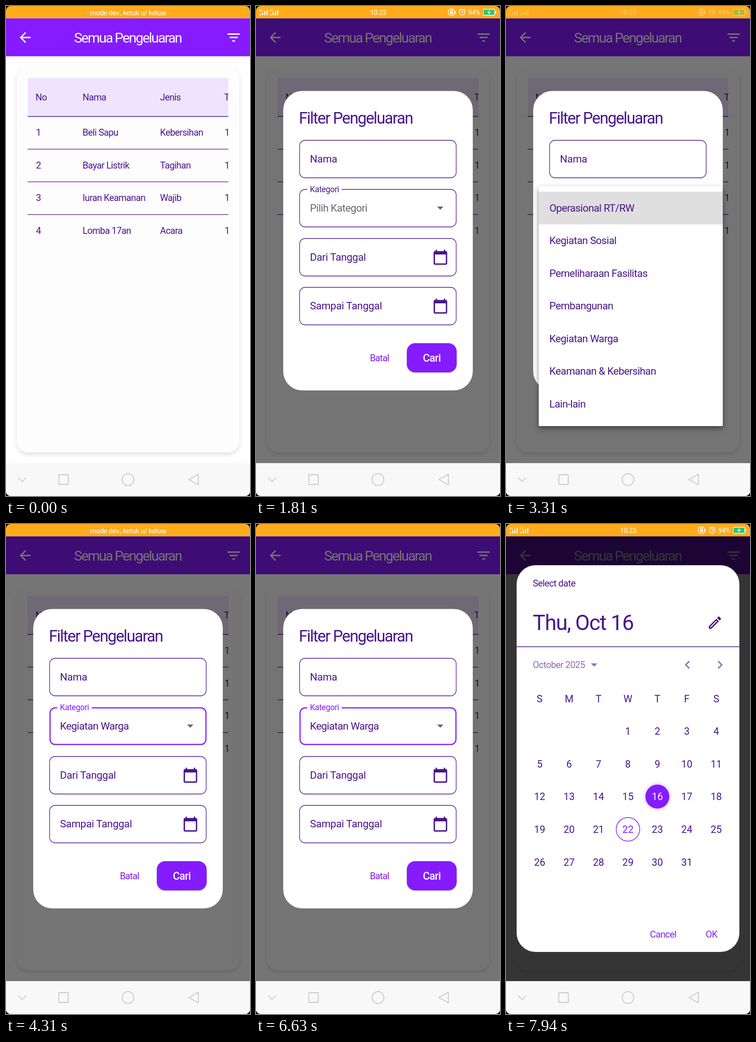
An HTML page that plays this animation: 529 px wide and 1058 px high, repeating every 8000 ms.

```html
<!DOCTYPE html>
<html lang="id">
<head>
<meta charset="utf-8">
<title>Semua Pengeluaran</title>
<style>
html, body { margin: 0; width: 100%; height: 100%; overflow: hidden; background: #000; }
svg { display: block; width: 100%; height: 100%; }
text { font-family: Roboto, "Noto Sans", sans-serif; fill: var(--ink); white-space: pre; }
:root { --ink: #4a148c; --main: #861bff; }

.cell { font-size: 20px; letter-spacing: -.62px; }
.bar { font-size: 30px; letter-spacing: -2px; fill: #fff; }
.head { font-size: 34.5px; letter-spacing: -1.7px; }
.field { font-size: 22.5px; letter-spacing: -.32px; }
.item { font-size: 22.5px; letter-spacing: -.62px; }
.label { font-size: 17.6px; letter-spacing: -.35px; }
.btn { font-size: 20px; letter-spacing: -.9px; fill: #7a1be6; }
.cari { font-size: 23px; letter-spacing: -.7px; font-weight: 500; fill: #fff; }
.date { font-size: 46px; letter-spacing: -1.3px; }
.day { font-size: 21.5px; text-anchor: middle; }
.tiny { font-size: 14.5px; letter-spacing: -.4px; fill: #fff; }
.mode { font-size: 15.5px; letter-spacing: -.5px; fill: #fff; }
.net { font-size: 7px; fill: #fff; }
.mid { text-anchor: middle; }
.white { fill: #fff; }
.main { fill: var(--main); }
.grey { fill: #686868; }
.soft { fill: #8e6cb8; }
.line { fill: none; stroke: var(--ink); stroke-width: 1.3; }
.focus { fill: none; stroke: var(--main); stroke-width: 2.5; }
.nav { fill: none; stroke: #c6c6c6; stroke-width: 1.8; }

/* one loop is 8 s, so 1% is 80 ms */
.dev, .clock, .tap, .dialog, .menu, .panel, .item-in, .press, .picker, .splash {
  animation: 8s linear infinite both;
}
.dev { animation-name: dev; }
.clock { animation-name: clock; }
.tap { animation-name: tap; }
.dialog { animation-name: dialog; }
.menu { animation-name: menu; }
.panel { animation-name: panel; filter: drop-shadow(0 5px 6px rgba(0,0,0,.45)); }
.item-in { animation-name: items; }
.press { animation-name: press; }
.picker { animation-name: picker; }
.splash { animation-name: splash; }
.focus-on { animation: focus-on 8s step-end infinite; }
.focus-off { animation: focus-off 8s step-end infinite; }
.chosen { animation: chosen 8s step-end infinite; }
.hint { animation: hint 8s step-end infinite; }
.after { animation: after 8s step-end infinite; }
.before { animation: before 8s step-end infinite; }

@keyframes dev { 0%, 1.25% { opacity: 1 } 5.6%, 43.1% { opacity: 0 } 48.1%, 77.5% { opacity: 1 } 82.2%, 100% { opacity: 0 } }
@keyframes clock { 0%, 6.2% { opacity: 0 } 11%, 39% { opacity: 1 } 42.8%, 83.1% { opacity: 0 } 87.5%, 100% { opacity: 1 } }
@keyframes tap { 0%, 15.6% { opacity: 0; r: 8px } 16.6% { opacity: .04 } 17.3% { opacity: .035; r: 26px } 19.6%, 100% { opacity: 0; r: 26px } }
@keyframes dialog { 0%, 18.5% { opacity: 0; animation-timing-function: ease-out } 20.4%, 100% { opacity: 1 } }
@keyframes menu { 0%, 27% { opacity: 0 } 28%, 51.9% { opacity: 1 } 53%, 100% { opacity: 0 } }
@keyframes panel { 0%, 28% { y: 400px; height: 71px; animation-timing-function: ease } 29%, 100% { y: 389px; height: 518px } }
@keyframes items { 0%, 29% { opacity: 0 } 29.4%, 60% { opacity: 1 } 61%, 100% { opacity: 0 } }
@keyframes press { 0%, 49.3% { opacity: 0; r: 20px } 49.8% { opacity: .12 } 51.9% { opacity: .12; r: 260px } 53%, 100% { opacity: 0; r: 260px } }
@keyframes picker { 0%, 86.2% { opacity: 0; animation-timing-function: ease-out } 88.1%, 100% { opacity: 1 } }
@keyframes splash { 0%, 96.2% { opacity: 0; r: 8px } 97% { opacity: .12 } 98.3% { opacity: .12; r: 31px } 100% { opacity: .08; r: 31px } }
@keyframes focus-on { 0% { opacity: 0 } 27%, 100% { opacity: 1 } }
@keyframes focus-off { 0% { opacity: 1 } 27%, 100% { opacity: 0 } }
@keyframes chosen { 0% { opacity: 0 } 52%, 100% { opacity: 1 } }
@keyframes hint { 0% { opacity: 1 } 52%, 100% { opacity: 0 } }
@keyframes after { 0% { opacity: 0 } 97%, 100% { opacity: 1 } }
@keyframes before { 0% { opacity: 1 } 97%, 100% { opacity: 0 } }
</style>
</head>
<body>
<svg id="stage" viewBox="0 0 529 1058" xmlns="http://www.w3.org/2000/svg"></svg>
<script>
const icons = {
  back: 'M20 11H7.83l5.59-5.59L12 4l-8 8 8 8 1.41-1.41L7.83 13H20v-2z',
  filter: 'M10 18h4v-2h-4v2zM3 6v2h18V6H3zm3 7h12v-2H6v2z',
  calendar: 'M20 3h-1V1h-2v2H7V1H5v2H4c-1.1 0-2 .9-2 2v16c0 1.1.9 2 2 2h16c1.1 0 2-.9 2-2V5c0-1.1-.9-2-2-2zm0 18H4V8h16v13z',
  pencil: 'M14.06 9.02l.92.92L5.92 19H5v-.92l9.06-9.06M17.66 3c-.25 0-.51.1-.7.29l-1.83 1.83 3.75 3.75 1.83-1.83c.39-.39.39-1.02 0-1.41l-2.34-2.34c-.2-.2-.45-.29-.71-.29zm-3.6 3.19L3 17.25V21h3.75L17.81 9.94l-3.75-3.75z',
  prev: 'M15.41 7.41 14 6l-6 6 6 6 1.41-1.41L10.83 12z',
  next: 'M10 6 8.59 7.41 13.17 12l-4.58 4.59L10 18l6-6z',
  drop: 'M7.4 10h9.2L12 14.8z'
};

const text = (x, y, str, cls) => `<text x="${x}" y="${y}" class="${cls}">${str.replace('&', '&amp;')}</text>`;
const rect = (x, y, w, h, rx, attrs) => `<rect x="${x}" y="${y}" width="${w}" height="${h}" rx="${rx}" ${attrs}/>`;
const disc = (x, y, r, attrs) => `<circle cx="${x}" cy="${y}" r="${r}" ${attrs}/>`;
const group = (cls, ...parts) => `<g class="${cls}">${parts.join('')}</g>`;
const path = (d, attrs) => `<path d="${d}" ${attrs}/>`;
const icon = (name, x, y, fill) =>
  path(icons[name], `fill="${fill}" transform="translate(${x} ${y}) scale(1.47) translate(-12 -12)"`);
const range = (n, fn) => Array.from({ length: n }, (_, i) => fn(i)).join('');
const scrim = rect(0, 26.5, 529, 960.5, 0, 'fill="#000" fill-opacity=".54"');
const INK = '#4a148c';

function statusBar() {
  const signal = (x, name) => text(x, 12, name, 'net') +
    range(4, i => rect(x + 2 + i * 5, 17 - i * 3, 2.4, 3 + i * 3, 0, 'fill="#fff"'));
  const stroke = 'fill="none" stroke="#fff" stroke-width="1.5"';
  return rect(0, 0, 529, 26.5, 0, 'fill="#ffab1c"') +
    group('dev', text(265, 20, 'mode dev., ketuk u/ keluar', 'mode mid')) +
    group('clock',
      signal(6, '4G'), signal(29, '2G'),
      text(265, 19, '10.23', 'tiny mid'),
      disc(424, 13.5, 7.3, stroke), rect(420.8, 12.5, 6.4, 5, .5, 'fill="#fff"'),
      path('M422 13v-2a2 2 0 0 1 4 0v2M429 14h5M431.5 11.5v5', stroke),
      disc(447, 13.5, 6, stroke), path('M447 10v4h3M440.5 9l3-2.5M453.5 9l-3-2.5', stroke),
      text(460, 18.5, '94%', 'tiny'),
      rect(492.5, 7, 25, 13, 2.5, 'fill="#2fc46b" stroke="#fff" stroke-width="1.3"'),
      rect(518.5, 11, 2, 5, 1, 'fill="#fff"'),
      path('M507 8.5l-6 5.5h4l-1.5 4.5 6-5.5h-4z', 'fill="#fff"'));
}

function page() {
  const rows = [
    ['Beli Sapu', 'Kebersihan'], ['Bayar Listrik', 'Tagihan'],
    ['Iuran Keamanan', 'Wajib'], ['Lomba 17an', 'Acara']
  ];
  const row = (y, no, name, kind, last, dx = 0) =>
    text(64 + dx, y, no, 'cell') + text(166, y, name, 'cell') + text(334, y, kind, 'cell') + text(473 + dx, y, last, 'cell');
  return rect(0, 26, 529, 1032, 0, 'fill="#fff"') +
    rect(23.5, 133, 482.5, 831, 24, 'fill="#fdfdfd" style="filter:drop-shadow(0 4px 5px rgba(0,0,0,.13))"') +
    `<g clip-path="url(#table)">` +
    rect(47, 155.5, 436, 83, 0, 'fill="#f0e4fc"') +
    row(204, 'No', 'Nama', 'Jenis', 'Tanggal') +
    rows.map((r, i) => row(280 + i * 70.6, String(i + 1), ...r, '16', 1)).join('') +
    range(4, i => path(`M47 ${238.5 + i * 70.6}H482`, 'class="line"')) + '</g>' +
    rect(0, 26.5, 529, 82, 0, 'class="main"') +
    icon('back', 41.5, 68, '#fff') + text(264, 79, 'Semua Pengeluaran', 'bar mid') +
    disc(493, 68, 8, 'class="tap white"') + icon('filter', 493.5, 68, '#fff');
}

function filterDialog() {
  const box = (y, cls = 'line') => rect(94.5, y, 339.5, 81, 12, `class="${cls}"`);
  const dateField = (y, label) => box(y) + text(117, y + 47.5, label, 'field') + icon('calendar', 399.8, y + 40.5, INK);
  return group('dialog', scrim,
    rect(59, 183.5, 411, 646.5, 41, 'fill="#fff"'),
    text(93, 254, 'Filter Pengeluaran', 'head'),
    box(290), text(117, 338, 'Nama', 'field'),
    box(396, 'line focus-off'),
    rect(95.5, 397, 338, 79, 11, 'class="focus focus-on"'),
    rect(111, 392, 75, 8, 0, 'fill="#fff"'),
    text(117, 402, 'Kategori', 'label focus-off'), text(117, 402, 'Kategori', 'label main focus-on'),
    text(117, 444, 'Pilih Kategori', 'item grey hint'), text(117, 444, 'Kegiatan Warga', 'item chosen'),
    icon('drop', 399.5, 436, '#666'),
    dateField(502, 'Dari Tanggal'), dateField(607.5, 'Sampai Tanggal'),
    text(247, 767, 'Batal', 'btn'),
    rect(327, 728, 108, 63, 18, 'class="main" style="filter:drop-shadow(0 1px 1px rgba(0,0,0,.3))"'),
    text(381, 768, 'Cari', 'cari mid'));
}

function categoryMenu() {
  const names = ['Operasional RT/RW', 'Kegiatan Sosial', 'Pemeliharaan Fasilitas', 'Pembangunan',
    'Kegiatan Warga', 'Keamanan & Kebersihan', 'Lain-lain'];
  return group('menu',
    rect(71, 389, 399, 518, 2, 'class="panel" fill="#fff"'),
    rect(71, 401, 399, 70.5, 0, 'fill="#dfdfdf"'),
    `<g clip-path="url(#option)">${disc(180, 718, 20, 'class="press"')}</g>`,
    names.map((n, i) => `<g class="item-in" style="animation-delay:${i * 19}ms">${text(94, 443.5 + i * 70.55, n, 'item')}</g>`).join(''));
}

function datePicker() {
  const colX = c => 73 + c * 63.8;
  const rowY = r => 447.5 + r * 70.55;
  const day = n => {
    const cell = n + 2, x = colX(cell % 7), y = rowY(Math.floor(cell / 7));
    const label = cls => text(x, y + 7.8, String(n), 'day ' + cls);
    const filled = cls => group(cls, disc(x, y, 26, 'class="main"'), label('white'));
    if (n === 16) return disc(x, y, 8, 'class="splash main"') + label('before') + filled('after');
    if (n === 22) return filled('before') +
      group('after', disc(x, y, 25.5, 'fill="none" stroke="#861bff" stroke-width="1.5"'), label('main'));
    return label('');
  };
  return group('picker', scrim,
    rect(23, 89, 483, 835, 41, 'fill="#fff"'),
    text(58, 135, 'Select date', 'cell'),
    text(58, 229, 'Wed, Oct 22', 'date before'), text(58, 229, 'Thu, Oct 16', 'date after'),
    icon('pencil', 453, 213, INK),
    path('M23 265H506', 'class="line"'),
    text(58, 311, 'October 2025', 'cell soft'),
    icon('drop', 191, 304, '#8e6cb8'), icon('prev', 393.5, 304, '#8e6cb8'), icon('next', 464, 304, '#8e6cb8'),
    [...'SMTWTFS'].map((d, i) => text(colX(i), 384.5, d, 'day')).join(''),
    range(31, i => day(i + 1)),
    text(312, 893, 'Cancel', 'cell main'), text(433, 893, 'OK', 'cell main'));
}

function navBar() {
  return rect(0, 987, 529, 71, 0, 'fill="#f8f8f8"') +
    path('M26.5 1018l8.5 9 8.5-9', 'class="nav"') +
    rect(114.5, 1012, 20.5, 21, 1, 'class="nav"') +
    disc(264.5, 1022.5, 12.8, 'class="nav"') +
    path('M396.5 1022.5L417 1011V1034Z', 'class="nav" stroke-linejoin="round"');
}

document.getElementById('stage').innerHTML =
  `<defs>
    <clipPath id="screen">${rect(0, 0, 529, 1058, 10, '')}</clipPath>
    <clipPath id="table">${rect(47, 155, 435, 400, 0, '')}</clipPath>
    <clipPath id="option">${rect(71, 683, 399, 70.5, 0, '')}</clipPath>
  </defs>
  <g clip-path="url(#screen)">${page()}${filterDialog()}${categoryMenu()}${datePicker()}${navBar()}${statusBar()}</g>`;
</script>
</body>
</html>
```
